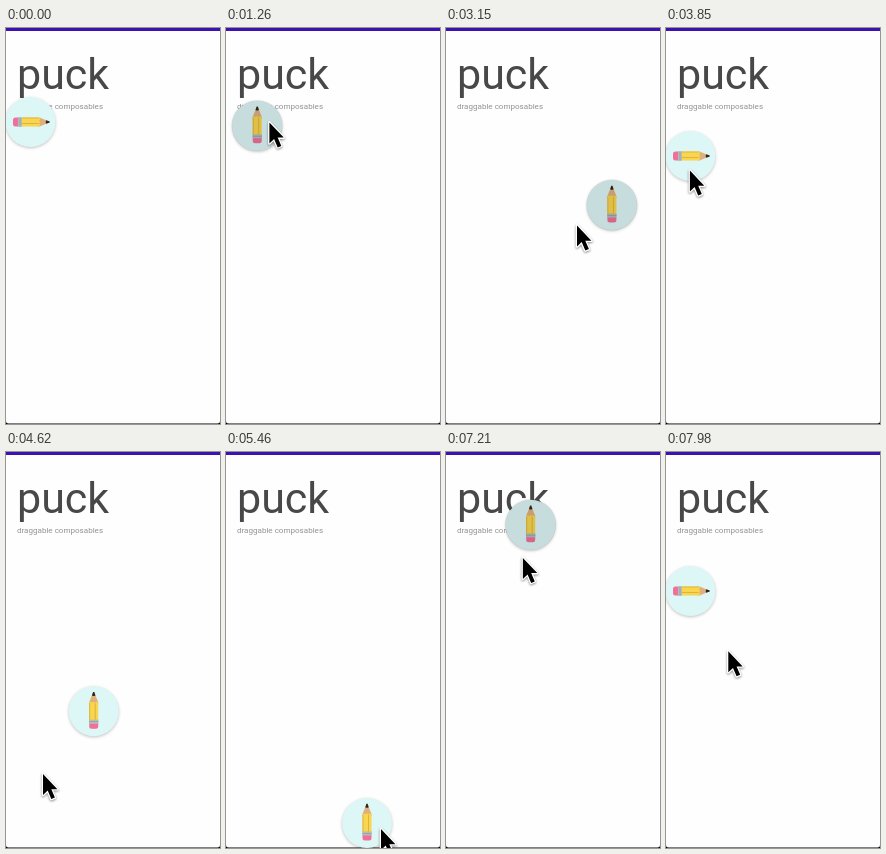
Write an HTML page that moves like this. It is 214 px wide and 396 px high and loops after 8 s.

```html
<!DOCTYPE html>
<html lang="en">
<head>
<meta charset="utf-8">
<title>puck</title>
<style>
  html, body { margin: 0; width: 100%; height: 100%; overflow: hidden; background: #fefefe; }
  svg { display: block; width: 214px; height: 396px; }
  text { font-family: Roboto, sans-serif; }
  #disc { fill: #ddf6f6; filter: drop-shadow(0 1.5px 1.5px rgba(0, 0, 0, .24)); }
  #ripple { opacity: 0; }
  .pressed #ripple { opacity: .1; }
  #cursor { filter: drop-shadow(0 1.5px 1.2px rgba(0, 0, 0, .45)); }
</style>
</head>
<body>
<svg viewBox="0 0 214 396">
  <rect width="214" height="396" fill="#fefefe"/>
  <text x="11" y="61" font-size="43" fill="#484848">puck</text>
  <text x="11" y="81" font-size="8.05" fill="#939393">draggable composables</text>
  <path d="M0 393Q0 395.5 2.5 395.5H211.5Q214 395.5 214 393V396H0Z"/>

  <g id="puck">
    <circle id="disc" r="25"/>
    <g id="pencil">
      <path d="M-4.5 -9L-.6 -18.8H.6L4.5 -9V-7H-4.5Z" fill="#dfb07c"/>
      <path d="M-1.7 -15.7L-.6 -19.2H.6L1.7 -15.7Q0 -14.7 -1.7 -15.7Z" fill="#2b2724"/>
      <path d="M-4.5 -8.5Q-3 -10.5 -1.5 -8.5Q0 -10.5 1.5 -8.5Q3 -10.5 4.5 -8.5V9H-4.5Z" fill="#f8d64e"/>
      <path d="M-4 -8V9M1.5 -8V9" stroke="#dfae3c" stroke-width=".9"/>
      <path d="M-4.5 12H4.5V15Q4.5 17.5 2 17.5H-2Q-4.5 17.5 -4.5 15Z" fill="#ef7099"/>
      <rect x="-4.7" y="8.5" width="9.4" height="4" fill="#b4bbb9"/>
      <path d="M-4.7 10.5H4.7" stroke="#8e9895" stroke-width=".6"/>
    </g>
    <circle id="ripple" r="25.5"/>
  </g>

  <rect width="214" height="3" fill="#3c12b0"/>
  <path id="cursor" d="M0 0V21L4.7 16.6L8.3 25L11.9 23.5L8.3 15.2H14.4Z"
        fill="#000" stroke="#fff" stroke-width="2.6" stroke-linejoin="round" paint-order="stroke"/>
</svg>
<script>
  const LOOP = 8000, STEP = 70, TURN = 210;

  // Each throw drags the puck to `drop`, then lets it glide to `dock`, facing inwards.
  const rest = { dock: [24.5, 94], angle: 90 };
  const throws = [
    { press: 1050, release: 1820, settle: 2450, drop: [115, 145], dock: [189, 177], angle: -90 },
    { press: 2870, release: 3500, settle: 3780, drop: [72, 177], dock: [24.5, 128], angle: 90 },
    { press: 3990, release: 4480, settle: 5110, drop: [80, 243], dock: [141, 371], angle: 0 },
    { press: 5670, release: 6090, settle: 6510, drop: [129, 84], dock: [125, 28], angle: 180 },
    { press: 6650, release: 7350, settle: 7630, drop: [62, 98], dock: [24.5, 139], angle: 90 }
  ];

  // Time and place of the points the cursor passes.
  const cursorStops = [
    [0, 84, 440], [210, 84, 440], [700, 28, 85], [1050, 29, 85], [1960, 135.5, 154.5],
    [2730, 172, 181], [2870, 171, 182], [3150, 131, 197.5], [3570, 23, 190], [3920, 24, 137],
    [4200, 95, 195], [4620, 37, 322], [5250, 171, 375], [5460, 155, 377], [5670, 155, 375],
    [6090, 160, 110], [6300, 169, 215], [6580, 128, 42], [7350, 72, 112], [7700, 85, 224],
    [LOOP, 62, 199]
  ];

  const ramp = (t, from, to) => Math.min(1, Math.max(0, (t - from) / (to - from)));
  const smooth = u => u * u * (3 - 2 * u);
  const mix = (a, b, u) => a + (b - a) * u;
  const between = (p, q, u) => p.map((value, i) => mix(value, q[i], u));

  function puckAt(t) {
    const n = throws.findLastIndex(({ press }) => t >= press);
    if (n < 0) return { place: rest.dock, angle: rest.angle, pressed: false };
    const { press, release, settle, drop, dock, angle } = throws[n];
    const start = throws[n - 1] || rest;
    if (t < release) return {
      place: between(start.dock, drop, ramp(t, press, release) ** 2),
      angle: mix(start.angle, 0, ramp(t, press, press + TURN)),
      pressed: true
    };
    return {
      place: between(drop, dock, smooth(ramp(t, release, settle))),
      angle: mix(0, angle, ramp(t, release, release + TURN)),
      pressed: false
    };
  }

  function cursorAt(t) {
    const n = cursorStops.findLastIndex(([time]) => t >= time);
    const [from, ...start] = cursorStops[n];
    const [to, ...end] = cursorStops[n + 1];
    return between(start, end, smooth(ramp(t, from, to)));
  }

  const [puck, pencil, cursor] = ['puck', 'pencil', 'cursor'].map(id => document.getElementById(id));

  function draw() {
    const t = Math.floor(performance.now() % LOOP / STEP) * STEP;
    const { place, angle, pressed } = puckAt(t);
    puck.setAttribute('transform', `translate(${place})`);
    puck.classList.toggle('pressed', pressed);
    pencil.setAttribute('transform', `rotate(${angle})`);
    cursor.setAttribute('transform', `translate(${cursorAt(t)})`);
    requestAnimationFrame(draw);
  }
  draw();
</script>
</body>
</html>
```
